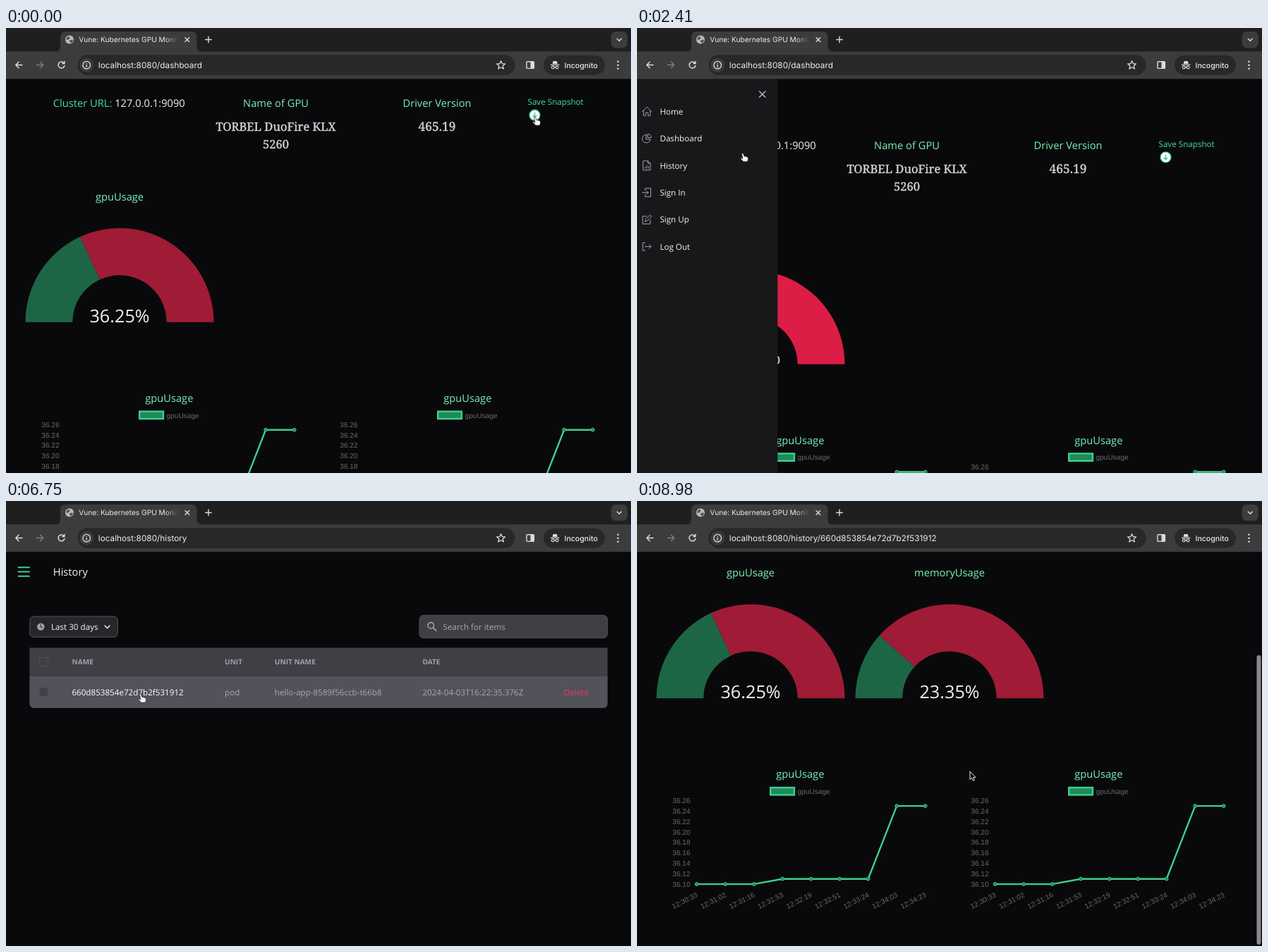
An HTML page that plays this animation: 886 by 632 pixels, repeating every 9.22 s.

```html
<!DOCTYPE html>
<html lang="en">
<head>
<meta charset="utf-8">
<title>GPU dashboard</title>
<style>
  html, body { margin: 0; width: 100%; height: 100%; overflow: hidden; background: #09090b; }
  svg { display: block; width: 886px; height: 632px; }
  text { font-family: "Open Sans", "Noto Sans", sans-serif; white-space: pre; text-rendering: geometricPrecision; }
  .ui { font-family: Inter, Roboto, sans-serif; fill: #ececed; }
  .h { font-size: 14.7px; }
  .s { font-size: 11.65px; }
  .serif { font-family: "Noto Serif", serif; font-size: 16.6px; fill: #d8d8dc; stroke: #d8d8dc; stroke-width: .35px; }
  .tick { font-family: "Liberation Sans", Arial, sans-serif; font-size: 10.1px; fill: #6a6a6a; }
  .th { font-size: 10.1px; font-weight: 700; fill: #a1a1aa; }
  .big { font-size: 25.2px; }
  .mid { text-anchor: middle; }
  .end { text-anchor: end; }
  .mint { fill: #7af0b8; }
  .green { fill: #48de9f; }
  .light { fill: #f4f4f5; }
  .grey { fill: #a8a8b0; }
  .line { fill: none; stroke-linecap: round; stroke-linejoin: round; }
</style>
</head>
<body>
<svg id="stage" viewBox="0 0 886 632" xmlns="http://www.w3.org/2000/svg"></svg>
<script>
const LOOP = 9220, STEP = 79.5;
const ITEM = '660d853854e72d7b2f531912';
const GREEN = '#3ecf8e';

// ---- drawing helpers
const text = (x, y, s, cls, more = '') => `<text x="${x}" y="${y}" class="${cls}" ${more}>${s}</text>`;
const rect = (x, y, w, h, fill, r = 0, more = '') =>
  `<rect x="${x}" y="${y}" width="${w}" height="${h}" rx="${r}" fill="${fill}" ${more}/>`;
const line = (d, color, w = 1.2, more = '') => `<path class="line" d="${d}" stroke="${color}" stroke-width="${w}" ${more}/>`;
const dot = (x, y, r, fill, more = '') => `<circle cx="${x}" cy="${y}" r="${r}" fill="${fill}" ${more}/>`;
const group = (id, body, more = '') => `<g id="${id}" ${more}>${body}</g>`;

function ring(cx, cy, from, to, fill) {
  const p = (r, v) => `${cx - r * Math.cos(v * Math.PI)} ${cy - r * Math.sin(v * Math.PI)}`;
  const R = 133.5, r = 66.7;
  return `<path d="M${p(R, from)}A${R} ${R} 0 0 1 ${p(R, to)}L${p(r, to)}A${r} ${r} 0 0 0 ${p(r, from)}Z" style="fill:${fill}"/>`;
}

function gauge(cx, name, pct) {
  const v = pct / 100, cy = 477.6;
  return text(cx, 304.5, name, 'h mid mint') +
    ring(cx, cy, 0, v, 'var(--used)') + ring(cx, cy, v, 1, 'var(--free)') +
    text(cx, 477.4, pct + '%', 'big mid light');
}

function chart(dx) {
  const y = v => 741.5 - (v - 36.1) / 0.02 * 14.8;
  const values = [36.1, 36.1, 36.1, 36.11, 36.11, 36.11, 36.11, 36.25, 36.25];
  const times = ['30:33', '31:02', '31:16', '31:53', '32:19', '32:51', '33:24', '34:03', '34:23'];
  const pts = values.map((v, i) => [84.7 + i * 40.5, y(v)]);
  let out = text(231.3, 590.5, 'gpuUsage', 'h mid mint') +
    rect(189.2, 604.4, 33.8, 10.4, '#1e8a59', 0, `stroke="${GREEN}" stroke-width="2.4"`) +
    text(227.6, 613.4, 'gpuUsage', 'tick');
  for (let i = 0; i <= 8; i++) {
    const v = 36.1 + i * 0.02;
    out += text(75.6, y(v) + 3.5, v.toFixed(2), 'tick end');
  }
  out += line('M' + pts.map(p => p.join(' ')).join('L'), GREEN, 2.4);
  pts.forEach(([px, py], i) => {
    out += dot(px, py, 2.4, '#1e8a59', `stroke="${GREEN}" stroke-width="1"`);
    out += text(0, 0, '12:' + times[i], 'tick end', `transform="translate(${px + 2} 759) rotate(-27)"`);
  });
  return `<g transform="translate(${dx})">${out}</g>`;
}

const header = title =>
  line('M17.5 94.3H33M17.5 100.5H33M17.5 106.7H33', GREEN, 1.9) + text(66.8, 105.6, title, 'h light');

const info = (nameX, driverX) =>
  text(66.8, 171.6, 'Cluster URL: <tspan class="light">127.0.0.1:9090</tspan>', 'h green') +
  text(nameX, 171.6, 'Name of GPU', 'h mid mint') +
  text(nameX, 205.6, 'TORBEL DuoFire KLX', 'serif mid') +
  text(nameX, 231, '5260', 'serif mid') +
  text(driverX, 171.6, 'Driver Version', 'h mid mint') +
  text(driverX, 205.6, '465.19', 'serif mid', 'style="font-size:17.4px"');

const charts = chart(0) + chart(423);

// ---- pages
const dashboard = header('Dashboard') + info(382.5, 611) +
  text(739.5, 168.6, 'Save Snapshot', 's green') +
  dot(749.5, 183.5, 7.4, '#fff', `stroke="${GREEN}" stroke-width="1.4"`) +
  line('M749.5 180.2V186.6M747 184.3L749.5 186.8L752 184.3', '#2fae78', 1.1) +
  gauge(161, 'gpuUsage', '36.25') + charts;

const detail = header('History: ' + ITEM) + info(371.5, 588.8) +
  rect(706.7, 155, 112.6, 35, '#e11d48', 4) +
  text(763, 177, 'Delete Snapshot', 's mid', 'fill="#fff"') +
  gauge(161, 'gpuUsage', '36.25') + gauge(443, 'memoryUsage', '23.35') + charts;

const edge = 'stroke="#52525b" stroke-width="1"';
const cells = [[93.5, 'NAME'], [310, 'UNIT'], [380.8, 'UNIT NAME'], [590.4, 'DATE']];
const history = header('History') +
  rect(33.8, 164, 124.5, 29.3, '#27272a', 5, edge + ' id="range"') +
  dot(49.3, 178.6, 5.2, '#a1a1aa') + line('M49.3 175.6V178.8L51.3 180', '#27272a', 1.1) +
  text(64, 183, 'Last 30 days', 's light') + line('M140 177L143.5 180.5L147 177', '#e4e4e7', 1.6) +
  rect(586, 162.2, 266.6, 32.4, '#3f3f46', 6, edge) +
  dot(602.4, 176.8, 4.2, 'none', 'stroke="#a1a1aa" stroke-width="1.6"') +
  line('M605.6 180L609.8 184.2', '#a1a1aa', 1.8) +
  text(619.5, 183, 'Search for items', 's grey') +
  rect(33.4, 208.4, 819.4, 40.6, '#3f3f46') +
  rect(47.3, 222.2, 12.4, 12.4, '#3f3f46', 2.5, edge) +
  cells.map(c => text(c[0], 232.4, c[1], 'th')).join('') +
  group('row',
    `<path id="rowBg" d="M33.4 249H852.8V288a6 6 0 0 1-6 6H39.4a6 6 0 0 1-6-6Z"/>` +
    rect(47.3, 264.8, 12.4, 12.4, '#3f3f46', 2.5, edge) +
    text(93.4, 275.6, ITEM, 's', 'fill="#fff" font-weight="500"') +
    text(310, 275.6, 'pod', 's grey') +
    text(380.8, 275.6, 'hello-app-8589f56ccb-t66b8', 's grey') +
    text(590.4, 275.6, '2024-04-03T16:22:35.376Z', 's grey') +
    text(790.8, 275.6, 'Delete', 's', 'fill="#f0355b"'));

// ---- drawer; icons are drawn around their own centre
const menu = [
  ['Home', 'M-6.5 0L0-6.5L6.5 0M-4.8-1.5V6H-1.7V1.5H1.7V6H4.8V-1.5'],
  ['Dashboard', 'M-1-5.5A5.8 5.8 0 1 0 5 1H-1ZM1.5-6.3A5.6 5.6 0 0 1 6.3-1.3H1.5Z'],
  ['History', 'M-5-6.5H1.5L5-3V6.5H-5ZM1.5-6.5V-3H5M-2.4 4V2M0 4V.2M2.4 4V1.2'],
  ['Sign In', 'M-2.5-3V-6H5.5V6H-2.5V3M-6.5 0H2M-.5-2.5L2 0L-.5 2.5'],
  ['Sign Up', 'M-2.5 2.5L-1.8-.6L4.4-6.5L6.6-4.3L.6 1.8ZM-.5-4.8H-6V6.2H4.8V.8'],
  ['Log Out', 'M-2.5-5.5H-5.8V5.5H-2.5M-2.8 0H6M3.2-2.8L6 0L3.2 2.8']
];
const drawer = rect(0, 72, 213.5, 560, '#18181b') +
  line('M187.7 90L196 98.3M196 90L187.7 98.3', '#b4b4bb', 1.5) +
  menu.map(([label, icon], i) => {
    const y = 118.6 + i * 38.36;
    return rect(13.3, y - 16, 186.8, 32, '#3f3f46', 6, `id="hot${i}" opacity="0"`) +
      `<g transform="translate(28.2 ${y})">${line(icon, '#a1a1aa', 1, `id="icon${i}"`)}</g>` +
      text(46.6, y + 4.3, label, 's light');
  }).join('');

// ---- browser frame
const pale = '#dcdcdd';
const browser = rect(0, 0, 886, 34, '#1f1f20') + rect(0, 33.3, 886, 39, '#3c3c3d') +
  `<path d="M69 33.5q8 0 8-8V13q0-8 8-8H262.5q8 0 8 8V25.5q0 8 8 8Z" fill="#3c3c3d"/>` +
  dot(90, 16.6, 6, '#b9babc') +
  `<path d="M86 13.5l3.5-1.5 1 2-2 2.5-3 .5ZM90 17.5l4.5-1 .5 2-3 3-1.5-1.5Z" fill="#505152"/>` +
  text(103.2, 20.2, 'Vune: Kubernetes GPU Monito', 'ui', 'font-size="10.2"') +
  rect(226, 8, 18, 18, 'url(#fade)') + rect(244, 8, 6, 18, '#3c3c3d') +
  line('M254 13.7L259.7 19.4M259.7 13.7L254 19.4', pale, 1.4) +
  line('M282.7 16.5H291.3M287 12.2V20.8', pale, 1.4) +
  rect(857.7, 5, 23.3, 23.3, '#3c3c3d', 7) + line('M866.3 15.2L869.3 18.2L872.3 15.2', pale, 1.5) +
  line('M23 52.5H14M18 48.3L13.8 52.5L18 56.7', pale, 1.5) +
  line('M43.5 52.5H52.5M48.5 48.3L52.7 52.5L48.5 56.7', '#7d7d7e', 1.5) +
  line('M82.3 50A4.5 4.5 0 1 0 82.9 53.5M82.9 47.5V50.5H79.9', pale, 1.5) +
  rect(101.5, 38.3, 620, 28.7, '#28282a', 14.3) + dot(114.2, 52.7, 10, '#3c3c3d') +
  dot(114.2, 52.7, 5.3, 'none', `stroke="${pale}" stroke-width="1.3"`) +
  line('M114.2 52.5V55.3M114.2 50.1V50.2', pale, 1.3) +
  text(130.8, 56.8, '', 'ui', 'id="url" font-size="11.8"') +
  line('M701.6 46.7L703.3 50.6L707.5 51L704.3 53.8L705.3 58L701.6 55.8L697.9 58L698.9 53.8L695.7 51L699.9 50.6Z', pale, 1.3) +
  rect(738, 47.8, 10.4, 9.6, 'none', 1, `stroke="${pale}" stroke-width="1.4"`) + rect(743.5, 47.8, 5, 9.6, pale) +
  rect(762, 38.7, 87, 28, '#28282a', 14) +
  `<path d="M774.5 51l1.2-4h5l1.2 4Z" fill="${pale}"/>` + line('M772.3 52.3H784.1M777 55.7H779.4', pale, 1.2) +
  [775.3, 781.1].map(x => dot(x, 56, 1.9, 'none', `stroke="${pale}" stroke-width="1.2"`)).join('') +
  text(791.5, 56.5, 'Incognito', 'ui', 'font-size="10.6" font-weight="500"') +
  [47.7, 52.7, 57.7].map(y => dot(867.5, y, 1.3, pale)).join('');

const cursors =
  `<path id="arrow" d="M0 0V11.5L2.6 9.2L4.4 13.2L6.4 12.3L4.7 8.5H8Z" fill="#0b0b0c" stroke="#e6e6e6" stroke-width="1"/>` +
  `<path id="hand" d="M-2.4 1.7a1.2 1.2 0 0 1 2.3-.4L1 4.8q1.7-.7 2.2.4 1.700-.4 2 .7 1.500 0 1.500 1.500L6.400 10 5.300 12.300H-.2L-3.900 8.300c-.6-1 .3-1.700 1.300-1.100L-1 8.200Z" fill="#f4f4f4" stroke="#222" stroke-width=".7"/>`;

document.getElementById('stage').innerHTML =
  `<defs><linearGradient id="fade"><stop stop-color="#3c3c3d" stop-opacity="0"/><stop offset="1" stop-color="#3c3c3d"/></linearGradient></defs>` +
  rect(0, 0, 886, 632, '#09090b') +
  group('dashboard', dashboard) + group('history', history) + group('detail', detail) +
  rect(878.5, 74, 6, 411, '#8a8a8c', 3, 'id="bar"') +
  group('drawer', drawer) + browser + group('cursor', cursors);

// ---- motion: [step, value] keys, straight in between
const scrollKeys = [[10, 59.8], [11, 42], [12, 4], [13, -19.5], [14, -24], [15, -19], [17, -8], [19, -2], [20, 0],
  [98, 0], [99, 6], [100, 32], [102, 98], [103, 116], [104, 122], [106, 122], [108, 158], [110, 194], [111, 198], [112, 198], [113, 197.4]];
const barKeys = [[11, 0], [12, 1], [18, 1], [22, 0], [98, 0], [99, 1]];
const drawerKeys = [[26, -214], [28, -110], [29, -48], [30, -14.2], [31, -3], [32, 0]];
const xKeys = [[6, 751], [8, 477.3], [14, 477.3], [21, 24], [26, 26], [29, 142], [30, 151], [34, 86], [38, 60], [45, 58],
  [57, 58], [62, 150], [66, 197], [71, 197], [73, 192], [90, 192], [93, 472]];
const yKeys = [[6, 126], [8, 262], [14, 262], [21, 99], [26, 101], [29, 168], [30, 177.5], [34, 156], [38, 163], [40, 165],
  [45, 190], [48, 190], [49, 191.5], [57, 191.5], [62, 346], [66, 282], [71, 282], [73, 274], [90, 274], [93, 384]];
const hotKeys = { 1: [[31, 0], [34, 1], [40, 1], [43, 0]], 2: [[40, 0], [44, 1]] };
const glowKeys = [[0, 0], [1, 0.4], [2, 0.85], [4, 1]];

function at(keys, s) {
  if (s <= keys[0][0]) return keys[0][1];
  for (let i = 1; i < keys.length; i++) {
    const [a, u] = keys[i - 1], [b, v] = keys[i];
    if (s <= b) return u + (v - u) * (s - a) / (b - a);
  }
  return keys[keys.length - 1][1];
}
const mix = (a, b, k) => `rgb(${a.map((v, i) => Math.round(v + (b[i] - v) * k))})`;
const el = id => document.getElementById(id);
const set = (id, key, value) => el(id).setAttribute(key, value);
const show = (id, on) => set(id, 'display', on ? 'inline' : 'none');

function draw(t) {
  const s = Math.floor((t + 10) / STEP);
  const page = s < 52 ? 'dashboard' : s < 88 ? 'history' : 'detail';
  const path = page === 'detail' ? 'history/' + ITEM : page;
  const scroll = at(scrollKeys, s), x = at(xKeys, s), y = at(yKeys, s);

  for (const id of ['dashboard', 'history', 'detail']) show(id, id === page);
  el('url').textContent = 'localhost:8080/' + path;
  set(page, 'transform', `translate(0 ${page === 'history' ? 0 : -scroll})`);
  const glow = page === 'dashboard' ? at(glowKeys, s) : 0;
  el(page).style.setProperty('--used', mix([29, 102, 69], [30, 136, 88], glow));
  el(page).style.setProperty('--free', mix([160, 27, 54], [220, 29, 69], glow));

  set('bar', 'y', 74 + Math.min(197, Math.max(0, scroll)) * 145 / 197);
  set('bar', 'opacity', at(barKeys, s));

  show('drawer', s > 26 && s < 52);
  set('drawer', 'transform', `translate(${at(drawerKeys, s)} 0)`);
  for (const i in hotKeys) {
    const k = at(hotKeys[i], s);
    set('hot' + i, 'opacity', k);
    set('icon' + i, 'stroke', mix([161, 161, 170], [255, 255, 255], k));
  }

  show('row', s > 52);
  set('rowBg', 'fill', y > 249 && y < 294 ? '#52525b' : '#27272a');
  set('range', 'fill', s < 58 ? '#3f3f46' : '#27272a');

  const hand = s < 7 || (s > 20 && s < 58) || (s > 71 && s < 91);
  show('hand', hand);
  show('arrow', !hand);
  set('cursor', 'transform', `translate(${x} ${y})`);
}

const start = performance.now();
function frame() {
  draw((performance.now() - start) % LOOP);
  requestAnimationFrame(frame);
}
frame();
</script>
</body>
</html>
```
